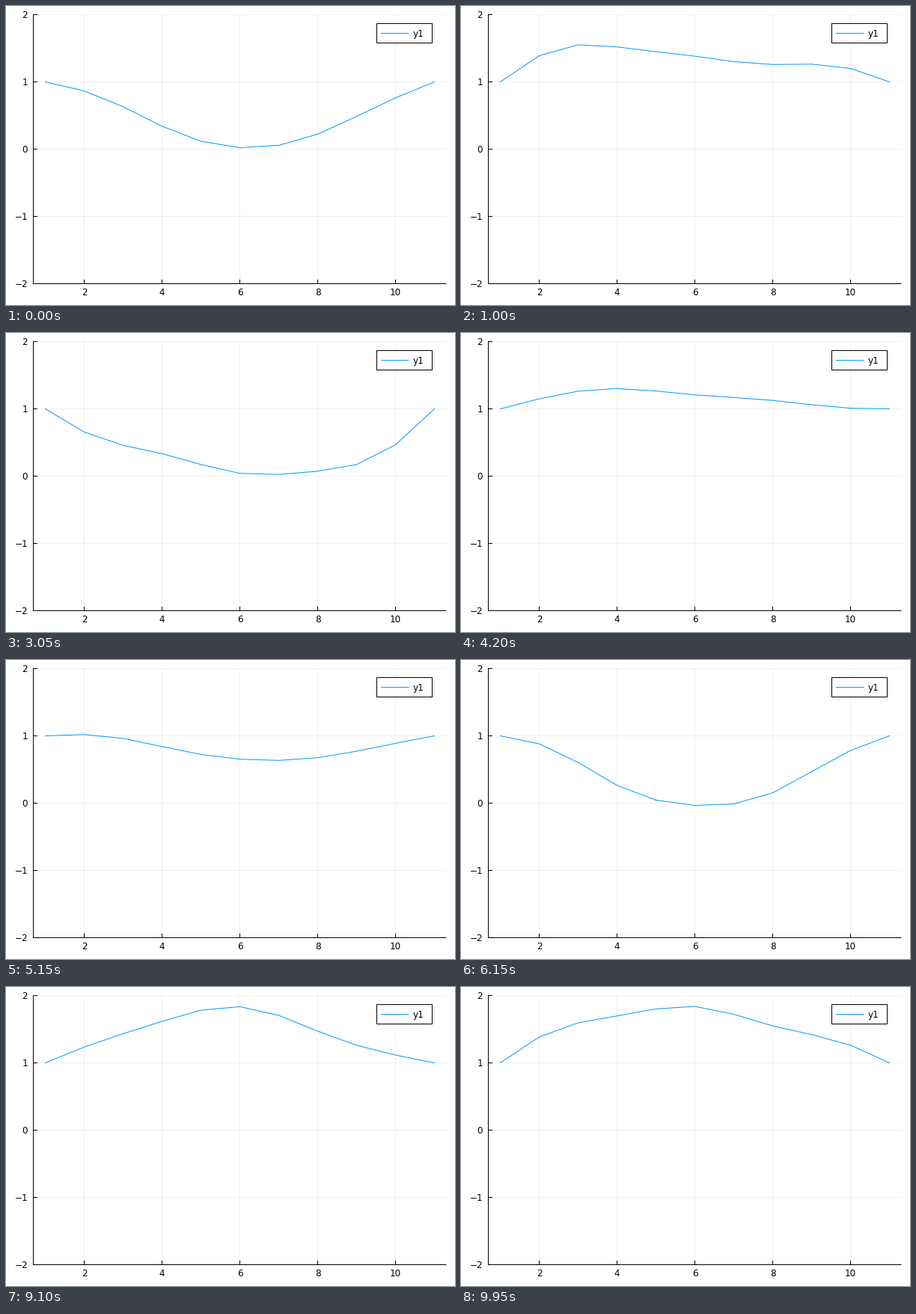
Recreate the animation shown at these times as a matplotlib script. Size 600 by 400 pixels, loop 10000 ms.

```python
import numpy as np
import matplotlib.pyplot as plt
from matplotlib.animation import FuncAnimation
from matplotlib.patches import Rectangle

W, H, DPI = 600, 400, 100
FRAMES, INTERVAL = 200, 50
PX = 72 / DPI  # one pixel in points
LEFT, RIGHT, TOP, BOTTOM = 36.5, 588, 11.5, 371.5
TICK = 5
BLUE = "#009af9"

# Standing waves of the string:
# (mode, offset, amplitude, degrees per frame, start phase)
WAVES = [
    (1, 0.02, 1.035, 58.46, -153),
    (2, 0.10, 0.045, 114.09, -133),
    (3, 0.00, 0.140, 178.46, 48),
    (4, 0.011, 0, 0, 0),
    (5, 0.00, 0.050, 66.5, 70),
]

plt.rcParams["font.family"] = "DejaVu Sans"


def to_x(x):
    return 0.5 + 52 * np.asarray(x)


def to_y(y):
    return TOP + 90 * (2 - np.asarray(y))


def string(frame):
    """Heights of the eleven points of the string, fixed at both ends."""
    s = np.linspace(0, np.pi, 11)
    return 1 + sum((offset + amp * np.cos(np.radians(rate * frame + phase)))
                   * np.sin(mode * s)
                   for mode, offset, amp, rate, phase in WAVES)


fig = plt.figure(figsize=(W / DPI, H / DPI), dpi=DPI, facecolor="white")
ax = fig.add_axes([0, 0, 1, 1])
ax.set(xlim=(0, W), ylim=(H, 0))
ax.axis("off")


def segment(xs, ys, color="black", **kw):
    return ax.plot(xs, ys, color=color, lw=PX, snap=False, **kw)[0]


def grid_line(xs, ys):
    segment(xs, ys, alpha=0.055, zorder=1)


def label(x, y, text, ha):
    ax.text(x, y, text, ha=ha, va="baseline", fontsize=12 * PX, zorder=6)


for v in range(2, 11, 2):
    x = to_x(v)
    grid_line([x, x], [TOP, BOTTOM])
    segment([x, x], [BOTTOM, BOTTOM - TICK], zorder=3)
    label(x, 387, str(v), "center")

for v in range(-2, 3):
    y = to_y(v)
    grid_line([LEFT, RIGHT], [y, y])
    segment([LEFT, LEFT + TICK], [y, y], zorder=3)
    label(29, y + 4.3, str(v).replace("-", "\u2212"), "right")

segment([LEFT, LEFT], [TOP, BOTTOM], zorder=3)
segment([LEFT, RIGHT], [BOTTOM, BOTTOM], zorder=3)

curve = segment(to_x(np.arange(1, 12)), to_y(string(0)), BLUE, zorder=4)
curve.set_clip_path(Rectangle((LEFT, TOP), RIGHT - LEFT, BOTTOM - TOP,
                              transform=ax.transData))

# Legend
ax.add_patch(Rectangle((495.5, 23.5), 74, 26, fc="white", ec="black",
                       lw=PX, snap=False, zorder=5))
segment([501.5, 538], [36.5, 36.5], BLUE, zorder=6)
label(544, 41, "y1", "left")


def update(frame):
    curve.set_ydata(to_y(string(frame)))
    return [curve]


anim = FuncAnimation(fig, update, frames=FRAMES, interval=INTERVAL,
                     repeat=True, repeat_delay=0)
plt.show()
```
